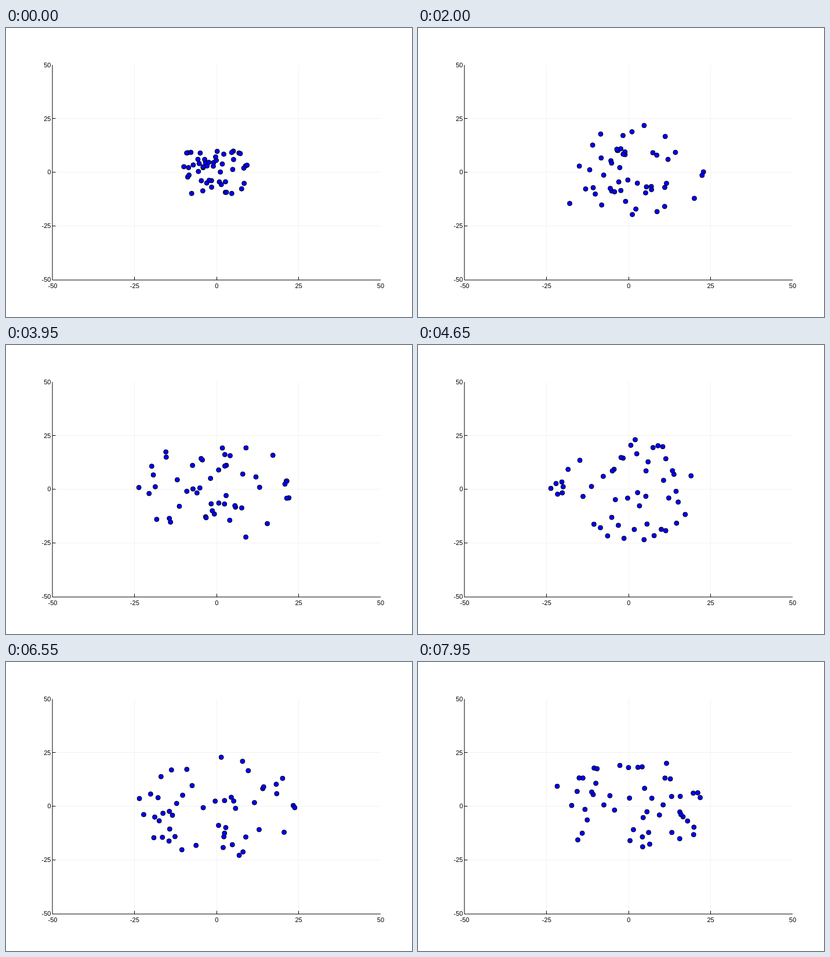
An HTML page for the animation above (8000 ms loop, 700 by 500 pixels).

```html
<!DOCTYPE html>
<html lang="en">
<head>
<meta charset="utf-8">
<title>Scatter in a disc</title>
<style>
  html, body { margin: 0; width: 100%; height: 100%; overflow: hidden; background: #fff; }
  svg { display: block; width: 700px; height: 500px; }
  text { font: 11px "Liberation Sans", Arial, sans-serif; fill: #000; }
  .grid { stroke: #f2f2f2; }
  .axis { stroke: #000; fill: none; }
  .dots { fill: #00f; stroke: #000; }
</style>
</head>
<body>
<svg id="plot" viewBox="0 0 700 500"></svg>
<script>
const plot = document.getElementById("plot");
const STEP = 50, LOOP = 8000;
const COUNT = 50, BOX = 10, RIM = 24.2, SPEED = 1.2;
const px = x => 363.2 + x * 5.655;
const py = y => 249.7 - y * 3.71;

function add(parent, tag, attrs, text) {
  const el = document.createElementNS("http://www.w3.org/2000/svg", tag);
  for (const key in attrs) el.setAttribute(key, attrs[key]);
  if (text !== undefined) el.textContent = text;
  parent.appendChild(el);
  return el;
}

const grid = add(plot, "g", { class: "grid" });
const axis = add(plot, "g", { class: "axis" });
const labels = add(plot, "g", {});
const dotLayer = add(plot, "g", { class: "dots" });

for (let v = -50; v <= 50; v += 25) {
  const x = Math.floor(px(v)) + 0.5, y = Math.floor(py(v)) + 0.5;
  if (Math.abs(v) < 50) {
    add(grid, "path", { d: `M${x} 64V435M81 ${y}H646` });
    add(axis, "path", { d: `M${x} 436V430.5M80 ${y}H85.5` });
  }
  add(labels, "text", { x: 77.5, y: py(v) + 3.6, "text-anchor": "end" }, v);
  add(labels, "text", { x: px(v), y: 450, "text-anchor": "middle" }, v);
}
add(axis, "path", { d: "M80 64V436H646" });

let seed = 20;
function random() {
  seed = (seed * 16807) % 2147483647;
  return seed / 2147483647;
}
const spread = size => (2 * random() - 1) * size;

// Straight flight from the central box; the rim sends it back in at a random angle
function flight() {
  let x = spread(BOX), y = spread(BOX), heading = spread(Math.PI);
  const path = [];
  for (let t = 0; t < LOOP; t += STEP) {
    path.push([px(x), py(y)]);
    let nx = x + SPEED * Math.cos(heading), ny = y + SPEED * Math.sin(heading);
    if (Math.hypot(nx, ny) > RIM) {
      heading = Math.atan2(-y, -x) + Math.asin(spread(0.95));
      nx = x + SPEED * Math.cos(heading);
      ny = y + SPEED * Math.sin(heading);
    }
    x = nx;
    y = ny;
  }
  return path;
}

const dots = Array.from({ length: COUNT }, () => ({
  path: flight(),
  el: add(dotLayer, "circle", { r: 4 })
}));

function draw(time) {
  const k = Math.floor((time % LOOP) / STEP);
  for (const { path, el } of dots) {
    el.setAttribute("cx", path[k][0]);
    el.setAttribute("cy", path[k][1]);
  }
}

const begin = performance.now();
function tick() {
  draw(performance.now() - begin);
  requestAnimationFrame(tick);
}
tick();
</script>
</body>
</html>
```
